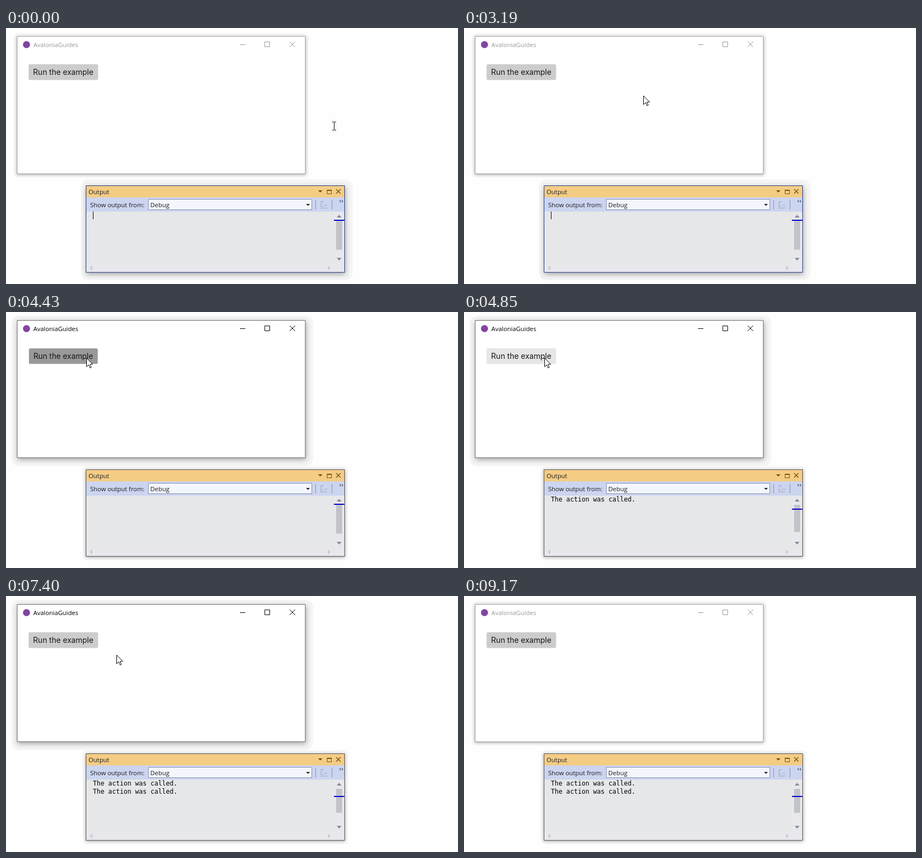
Animation, 827 px wide and 470 px high, one loop 9.23 s. Source, as an HTML page:

```html
<!DOCTYPE html>
<html lang="en">
<head>
<meta charset="utf-8">
<title>Run the example</title>
<style>
  html, body { margin: 0; width: 100%; height: 100%; overflow: hidden; background: #fefefe; }
  svg { display: block; width: 827px; height: 470px; }
  text { font: 11.4px "Open Sans", sans-serif; fill: #1e1e1e; white-space: pre; }
  .mono { font: 11.68px "DejaVu Sans Mono", monospace; fill: #000; }
  .label { font: 14px Inter, sans-serif; fill: #161616; }
  .line { fill: none; stroke-width: 1; }

  .on { display: none; }
  .active > .on { display: inline; }
  .active > .off { display: none; }

  #app .frame { stroke: #a9a9a9; }
  #app.active .frame { stroke: #707070; }
  #app .chrome { stroke: #999; }
  #app.active .chrome { stroke: #000; }
  #app .title { fill: #999; }
  #app.active .title { fill: #000; }
  #output .frame { stroke: #5a5b60; }
  #output.active .frame { stroke: #26418c; }
</style>
</head>
<body>
<svg viewBox="0 0 827 470">
  <defs>
    <filter id="soft" x="-10%" y="-20%" width="120%" height="140%"><feGaussianBlur stdDeviation="2.4"/></filter>
    <filter id="deep" x="-10%" y="-20%" width="120%" height="140%"><feGaussianBlur stdDeviation="5"/></filter>
  </defs>

  <g id="app">
    <g class="off">
      <rect x="14" y="9" width="540" height="266" rx="9" fill="#f7f7f7"/>
      <rect x="20" y="16" width="528" height="253" fill-opacity=".36" filter="url(#soft)"/>
    </g>
    <g class="on">
      <rect x="10" y="7" width="552" height="276" rx="14" fill="#f5f5f5"/>
      <rect x="21" y="18" width="528" height="253" fill-opacity=".34" filter="url(#deep)"/>
    </g>
    <rect class="frame" x="20.5" y="15.5" width="527" height="252" fill="#fff"/>
    <circle cx="37.5" cy="30.5" r="6.5" fill="#8344a5"/>
    <text class="title" x="50" y="35">AvaloniaGuides</text>
    <path class="line chrome" d="M428 30.5h10M473.5 25.5h9v9h-9zM519 25l10 10M529 25l-10 10"/>
    <g id="button">
      <rect id="face" x="41.3" y="66.5" width="127.2" height="29" rx="3"/>
      <text class="label" x="49.6" y="86">Run the example</text>
    </g>
  </g>

  <g id="output">
    <g class="off">
      <rect x="140" y="283" width="486" height="173" rx="9" fill="#f7f7f7"/>
      <rect x="146" y="290" width="474" height="160" fill-opacity=".36" filter="url(#soft)"/>
    </g>
    <g class="on">
      <rect x="137" y="278" width="497" height="185" rx="14" fill="#f5f5f5"/>
      <rect x="147" y="292" width="474" height="160" fill-opacity=".34" filter="url(#deep)"/>
    </g>
    <rect x="146" y="289" width="474" height="160" fill="#e8e8ec"/>
    <rect x="147" y="290" width="472" height="21" fill="#f5cc84"/>
    <rect x="147" y="311" width="472" height="26" fill="#ccd5f0"/>
    <rect x="147" y="337" width="453" height="97" fill="#e5e7e8"/>
    <rect class="frame line" x="146.5" y="289.5" width="473" height="159"/>

    <text x="151" y="305">Output</text>
    <g fill="#75500f" stroke="#75500f">
      <path d="M571 298h8l-4 4z" stroke="none"/>
      <path class="line" d="M587.5 297.5h8v7h-8zM587 298.5h9"/>
      <path class="line" d="M604 296l8 8M612 296l-8 8" style="stroke-width:1.4"/>
    </g>

    <text x="154" y="329">Show output from:</text>
    <rect x="260.5" y="314.5" width="299" height="19" fill="#f3f6fd" stroke="#8591b0"/>
    <text x="264" y="329">Debug</text>
    <path d="M549 323h7l-3.5 3.5z" fill="#1e1e1e"/>
    <path class="line" d="M566.5 316v17M596.5 316v17" stroke="#8591b0"/>
    <path class="line" d="M580 318.5h-3.500v8.500M575 327.5h5M582 325.5h6M575 330.5h13M580 318v3" stroke="#a2a8ba"/>
    <path class="line" d="M610.5 316l1.500 1.500-1 2.500M614.500 316l1.500 1.500-1 2.500" stroke="#111"/>

    <path d="M605 348l4.500-5 4.500 5zM605 422l4.500 5 4.500-5z" fill="#868999"/>
    <path d="M158 436v9l-5-4.500zM589 436v9l5-4.500z" fill="#cacbd3"/>
    <rect id="thumb" x="604" y="354" width="11" fill="#c2c3c9"/>
    <rect id="marker" x="600" width="19" height="2" fill="#0000cd"/>
    <text class="mono" id="line1" x="159" y="348">The action was called.</text>
    <text class="mono" id="line2" x="159" y="363">The action was called.</text>
    <path id="caret" class="line" d="M159.500 337v14" stroke="#000"/>
  </g>

  <g id="pointer">
    <path id="arrow" d="M.5 .5v16l3.700-3.500 2.600 5.700 2.300-1-2.500-5.700h5z" fill="#fff" stroke="#000"/>
    <path id="beam" class="line" d="M-3 -7.500h3M1 -7.500h3M.5 -7v14M-3 7.500h3M1 7.500h3" stroke="#000"/>
  </g>
</svg>
<script>
const LOOP = 9230;
const PRESSES = [4430, 6350];
const CARET_TOGGLES = [380, 930, 1430, 1990, 2490, 3000, 3480, 3960, 4430];

// Pointer paths: [time, x, y]
const ARRIVE = [[2610, 600, 180], [2790, 562, 172], [3250, 290, 116], [3590, 162, 88], [3760, 147, 84]];
const LEAVE = [[7280, 147, 84], [7340, 168, 93], [7400, 203, 108], [8220, 637, 276],
               [8520, 704, 362], [8810, 792, 466], [8870, 810, 490]];

const $ = id => document.getElementById(id);
const show = (id, visible) => $(id).style.display = visible ? 'inline' : 'none';

function along(path, t) {
  const next = path.findIndex(point => point[0] > t);
  if (next < 0) return path[path.length - 1].slice(1);
  if (next === 0) return path[0].slice(1);
  const [t0, x0, y0] = path[next - 1], [t1, x1, y1] = path[next];
  const k = (t - t0) / (t1 - t0);
  return [x0 + (x1 - x0) * k, y0 + (y1 - y0) * k];
}

// The pointer is redrawn in steps, not continuously.
const stepped = (t, start, step) => start + Math.floor((t - start) / step) * step;

function pointerAt(t) {
  const [x, y] = t < 7340 ? along(ARRIVE, stepped(t, 2670, 57.3))
                          : along(LEAVE, stepped(t, 7340, 58.8));
  return [Math.round(x), Math.round(y)];
}

function drawButton(t) {
  const held = PRESSES.map(press => t - press).find(age => age >= 0 && age < 180);
  const pressed = held < 120;
  const hovered = t >= 3650 && t < 7340;
  const scale = held === undefined ? 1 : held >= 60 && held < 120 ? 0.98 : 0.99;
  $('face').setAttribute('fill', pressed ? '#999' : hovered ? '#e6e6e6' : '#ccc');
  $('button').setAttribute('transform', `translate(105 81) scale(${scale}) translate(-105 -81)`);
}

function drawOutput(t) {
  const lines = t < 4850 ? 0 : t < 6840 ? 1 : 2;
  show('line1', lines > 0);
  show('line2', lines > 1);
  $('thumb').setAttribute('height', [53, 50, 44][lines]);
  $('marker').setAttribute('y', [352, 361, 367][lines]);
  const toggles = CARET_TOGGLES.filter(time => time <= t).length;
  show('caret', toggles % 2 === 0 && t < 4430);
}

function render(t) {
  $('app').classList.toggle('active', t >= 4430 && t < 9170);
  $('output').classList.toggle('active', t < 4430);
  drawButton(t);
  drawOutput(t);
  const [x, y] = pointerAt(t);
  $('pointer').setAttribute('transform', `translate(${x} ${y})`);
  show('arrow', x < 548);
  show('beam', x >= 548);
}

function tick() {
  render(performance.now() % LOOP);
  requestAnimationFrame(tick);
}
tick();
</script>
</body>
</html>
```
